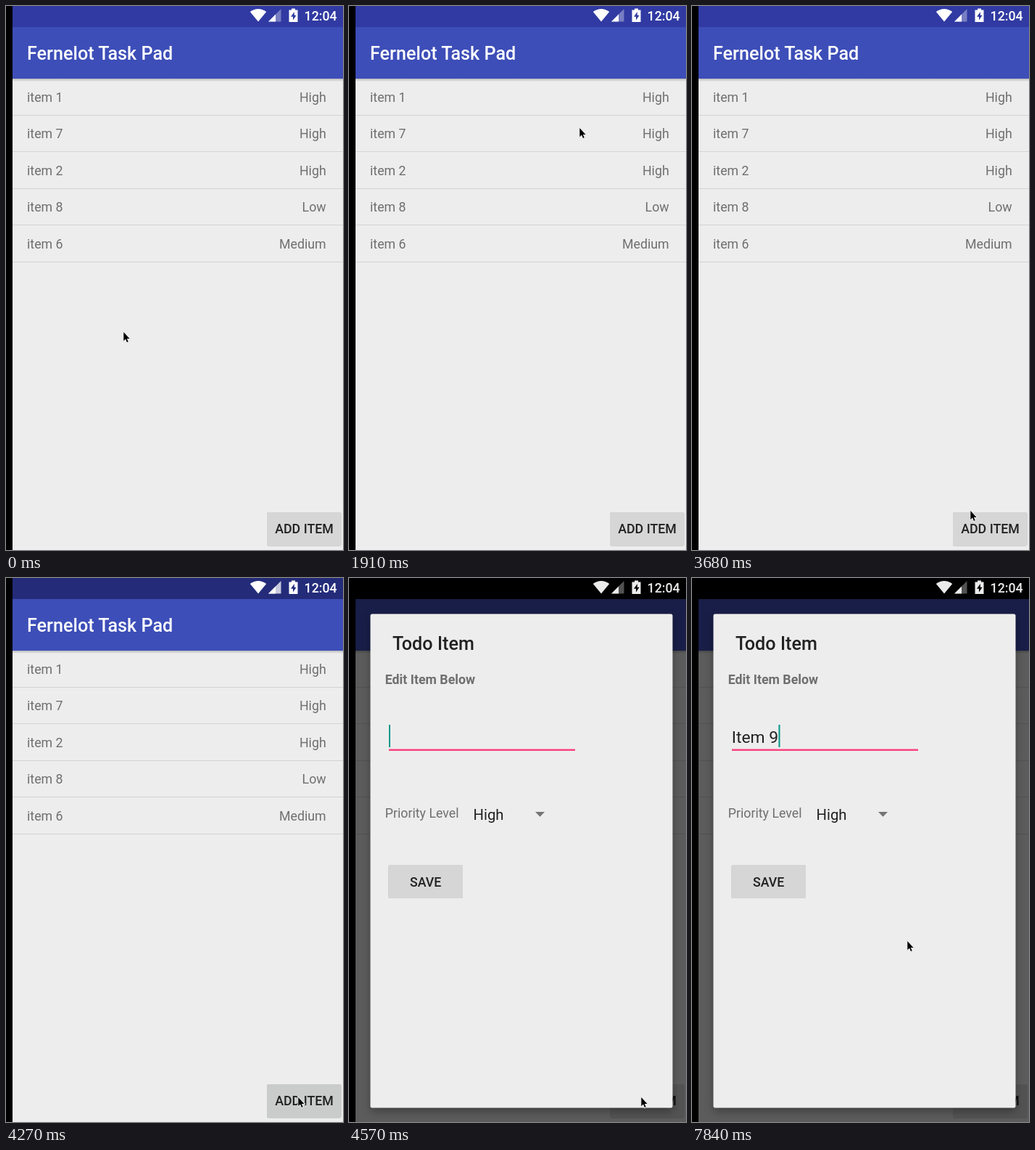
An HTML page that plays this animation: 465x749 px, repeating every 8 s.

```html
<!DOCTYPE html>
<html lang="en">
<head>
<meta charset="utf-8">
<title>Todo list</title>
<style>
  html, body { margin: 0; width: 100%; height: 100%; overflow: hidden; background: #000; }
  svg { display: block; width: 465px; height: 749px; font: 17.8px Roboto, sans-serif; }
  text { fill: #212121; white-space: pre; }
  .medium { font-weight: 500; }
  .title { font-size: 25.2px; font-weight: 500; }
  .muted { fill: #6f6f6f; }
  .light { fill: #fff; }
  .button { fill: #d6d6d6; filter: drop-shadow(0 .5px .7px rgba(0, 0, 0, .25)); }
  .pressed { fill: #cacccb; }
  .end { text-anchor: end; }
  .middle { text-anchor: middle; }
  .panel { fill: #ededed; filter: drop-shadow(0 5px 6px rgba(0, 0, 0, .3)); }
</style>
</head>
<body>
<svg viewBox="0 0 465 749">
  <defs>
    <linearGradient id="fade" x2="0" y2="1">
      <stop stop-opacity=".22"/>
      <stop offset="1" stop-opacity="0"/>
    </linearGradient>
  </defs>

  <rect x="9" width="456" height="749" fill="#ededed"/>
  <rect x="9" y="29" width="456" height="71" fill="#3d4eb8"/>
  <rect x="9" y="100" width="456" height="4" fill="url(#fade)"/>
  <text class="title light" x="29" y="74">Fernelot Task Pad</text>
  <g id="list"></g>
  <rect id="add" class="button" x="360" y="697" width="102.5" height="46.5" rx="2.5"/>
  <text class="medium middle" x="411.5" y="726">ADD ITEM</text>
  <rect id="dim" x="9" y="29" width="456" height="720" opacity="0"/>

  <rect x="9" width="456" height="29" fill="#303aa2"/>
  <rect id="shade" x="9" width="456" height="29" opacity="0"/>
  <g id="status" class="light">
    <path d="M348 21.5L336.8 8Q348 .2 359.2 8Z"/>
    <path id="signal" d="M362 21.5L379.5 4V21.5Z"/>
    <path d="M362 21.5L372 11.5V21.5Z"/>
    <path fill-rule="evenodd" d="M390.5 5.5h3.5v-2h5v2h3.5v16.5h-12zM397.8 8l-4.8 6.8h3v4.7l4.6-6.8h-2.8z"/>
    <text class="medium light end" x="456.7" y="20">12:04</text>
  </g>

  <g id="dialog" opacity="0">
    <rect class="panel" x="29.5" y="49.5" width="417" height="680" rx="2.5"/>
    <text class="title" x="60" y="99">Todo Item</text>
    <text class="muted" x="49.7" y="146" font-weight="700">Edit Item Below</text>
    <text id="entry" x="54.7" y="227" font-size="22.9"></text>
    <rect id="caret" y="202" width="2" height="31" fill="#009688"/>
    <rect x="55" y="235.5" width="257" height="2.5" fill="#fa4580"/>
    <text class="muted" x="49.7" y="329.5">Priority Level</text>
    <text x="171.5" y="333" font-size="20.3">High</text>
    <path d="M257 322H270L263.5 328.7Z" fill="#757575"/>
    <rect class="button" x="54.5" y="395" width="102.5" height="46" rx="2.5"/>
    <text class="medium middle" x="105.7" y="425">SAVE</text>
  </g>

  <path id="pointer" d="M.3 1V13.2L3 10.6L4.9 15L6.7 14.2L4.9 9.9H8.6Z"
        stroke="#fff" stroke-width="1.8" paint-order="stroke"
        style="filter:drop-shadow(0 .5px .7px rgba(0,0,0,.3))"/>
</svg>
<script>
const LOOP = 8000, TICK = 147.6;
const OPEN = 29, TYPE = 46; // ticks: button pressed, first key
const $ = id => document.getElementById(id);
const clamp = v => Math.min(1, Math.max(0, v));
const fade = (id, value) => $(id).setAttribute('opacity', value);

const items = { 'item 1': 'High', 'item 7': 'High', 'item 2': 'High', 'item 8': 'Low', 'item 6': 'Medium' };
$('list').innerHTML = Object.entries(items).map(([name, priority], i) => {
  const y = Math.round(132 + i * 50.4);
  return `<text class="muted" x="29" y="${y}">${name}</text>
    <text class="muted end" x="441.7" y="${y}">${priority}</text>
    <rect x="9" y="${y + 18}" width="456" height="1" fill="#d3d3d3"/>`;
}).join('');

// Each sweep runs evenly in ticks along a smooth curve, then rests.
const sweeps = [
  { from: 0, to: 7, points: [[162, 448], [213, 318], [125, 194], [76, 270], [131, 338]] },
  { from: 7, to: 13, points: [[131, 338], [125, 268], [222, 138], [318, 167]] },
  { from: 14, to: 19, points: [[318, 167], [425, 240], [372, 415]] },
  { from: 19, to: 27, points: [[372, 415], [366, 575], [378, 680], [403, 714]] },
  { from: 32, to: 36, points: [[403, 714], [297, 499]] }
];

// Catmull-Rom spline through the points, u from 0 to 1
function along(points, u) {
  const last = points.length - 1;
  const i = Math.min(last - 1, Math.floor(u * last));
  const t = u * last - i;
  const p = k => points[Math.min(last, Math.max(0, i + k))];
  return [0, 1].map(axis => {
    const [a, b, c, d] = [-1, 0, 1, 2].map(k => p(k)[axis]);
    return b + t / 2 * (c - a + t * (2 * a - 5 * b + 4 * c - d + t * (3 * (b - c) + d - a)));
  });
}

function drawPointer(tick) {
  const { from, to, points } = sweeps.findLast(s => s.from <= tick);
  const [x, y] = along(points, clamp((tick - from) / (to - from)));
  $('pointer').setAttribute('transform', `translate(${Math.round(x)} ${Math.round(y)})`);
}

function drawScreen(tick) {
  const open = clamp((tick - OPEN) / 2);
  const pressed = tick >= OPEN && open < 1;
  $('add').classList.toggle('pressed', pressed);
  fade('shade', open ? 1 : pressed ? .25 : 0);
  fade('signal', pressed ? .75 : .35);
  fade('status', 1 - .08 * open);
  fade('dim', .61 * open);
  fade('dialog', 1 - (1 - open) ** 2.6);
}

function drawEntry(tick) {
  const keyTicks = [TYPE, 48, 49, 49, 50, 53];
  const text = 'Item 9'.slice(0, keyTicks.filter(k => k <= tick).length);
  const blinkOn = Math.floor((tick - OPEN - .5) / 3.15) % 2 === 0;
  $('entry').textContent = text;
  $('caret').setAttribute('x', 55 + (text && $('entry').getComputedTextLength()));
  fade('caret', text || blinkOn ? 1 : 0);
}

const begin = performance.now();
function frame() {
  const time = (performance.now() - begin) % LOOP;
  const tick = Math.floor(time / TICK + .12);
  drawPointer(tick);
  drawScreen(tick);
  drawEntry(tick);
  requestAnimationFrame(frame);
}
frame();
</script>
</body>
</html>
```
